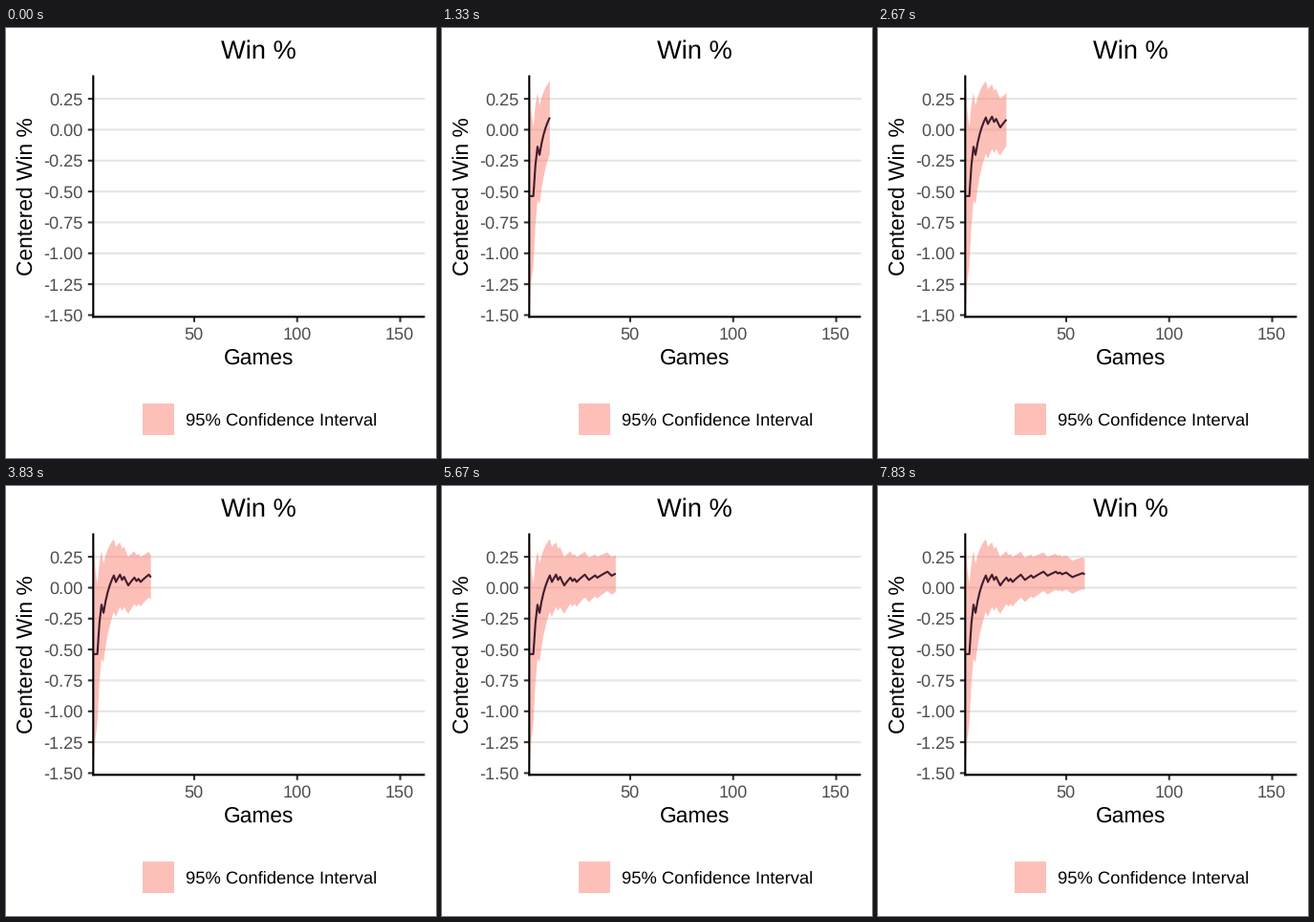
A matplotlib script for the animation above (8000 ms loop, 450 by 450 pixels).

```python
import numpy as np
import matplotlib.pyplot as plt
from matplotlib.animation import FuncAnimation
from matplotlib.patches import Polygon, Rectangle

SIZE, DPI = 450, 100
LOOP, INTERVAL = 8000, 40
HOLD = 1000 / 6                   # ms between reveals
LEAD = 0.9 * INTERVAL             # keeps a reveal from landing one tick late
GAMES, MEAN = 162, 87 / 162
STEP = (GAMES - 1) / 130          # games per reveal

LEFT, RIGHT, TOP, BOTTOM = 91.3, 438.4, 49.5, 302.3
SALMON, DARK, GRID = "#FB8275", "#421C2B", "#E5E5E5"

plt.rcParams["font.family"] = "Liberation Sans"
plt.rcParams["text.hinting"] = "no_hinting"


def pt(px):
    return px * 72 / DPI


# Alternating runs of losses and wins, starting with losses
RUNS = [3, 2, 1, 5, 1, 2, 1, 1, 2, 3, 1, 1, 1, 4, 2,
        3, 1, 5, 2, 4, 1, 1, 1, 2, 3, 5, 1]
wins = np.repeat(np.arange(len(RUNS)) % 2, RUNS)
game = np.arange(1, len(wins) + 1)
value = np.cumsum(wins) / game - MEAN
spread = 1.96 * np.sqrt(MEAN * (1 - MEAN) / game)
Y_MIN, Y_MAX = (value - spread)[0], (value + spread)[0]


def to_x(g):
    return LEFT + (g - 1) / (GAMES - 1) * (RIGHT - LEFT)


def to_y(v):
    return BOTTOM - (v - Y_MIN) / (Y_MAX - Y_MIN) * (BOTTOM - TOP)


xs, mid = to_x(game), to_y(value)
low, high = to_y(value - spread), to_y(value + spread)

fig = plt.figure(figsize=(SIZE / DPI, SIZE / DPI), dpi=DPI, facecolor="white")
ax = fig.add_axes([0, 0, 1, 1])
ax.set_xlim(0, SIZE)
ax.set_ylim(SIZE, 0)
ax.axis("off")


def stroke(x, y, color, z, width=2.1):
    return ax.plot(x, y, color=color, lw=pt(width), zorder=z, snap=False,
                   solid_capstyle="butt", solid_joinstyle="round")[0]


def label(x, y, text, px, color="black", ha="center", rotation=0):
    ax.text(x, y, text, fontsize=pt(px), color=color, ha=ha, va="baseline",
            rotation=rotation, rotation_mode="anchor")


for v in np.arange(0.25, -1.51, -0.25):
    y = to_y(v)
    stroke([LEFT, RIGHT], [y, y], GRID, 1)
    stroke([LEFT - 5.5, LEFT], [y, y], "#333333", 4)
    label(80.8, y + 6.5, f"{v:.2f}", 18.2, "#4D4D4D", "right")

for g in (50, 100, 150):
    x = to_x(g)
    stroke([x, x], [BOTTOM, BOTTOM + 5.5], "#333333", 4)
    label(x - 0.3, 326.3, str(g), 18.2, "#4D4D4D")

stroke([LEFT, LEFT], [TOP, BOTTOM + 1], "black", 5)
stroke([LEFT - 1, RIGHT], [BOTTOM, BOTTOM], "black", 5)

label(264.8, 32, "Win %", 27.3)
label(264.8, 352, "Games", 22.8)
label(28, 176.3, "Centered Win %", 22.8, rotation=90)

ax.add_patch(Rectangle((143, 393), 33, 33, fc=SALMON, alpha=0.5, lw=0))
label(188.4, 416.2, "95% Confidence Interval", 18.4, ha="left")

band = ax.add_patch(Polygon([(LEFT, TOP)] * 3, fc=SALMON, alpha=0.5, lw=0, zorder=2))
line = stroke([], [], DARK, 3)


def update(frame):
    reveal = int((frame * INTERVAL + LEAD) / HOLD)
    n = 1 + round(reveal * STEP)
    edge_x = np.r_[xs[:n], xs[:n][::-1]]
    edge_y = np.r_[high[:n], low[:n][::-1]]
    band.set_xy(np.column_stack([edge_x, edge_y]))
    band.set_visible(n > 1)
    line.set_data(xs[:n], mid[:n])
    return band, line


anim = FuncAnimation(fig, update, frames=LOOP // INTERVAL, interval=INTERVAL,
                     repeat=True, repeat_delay=0)
plt.show()
```
